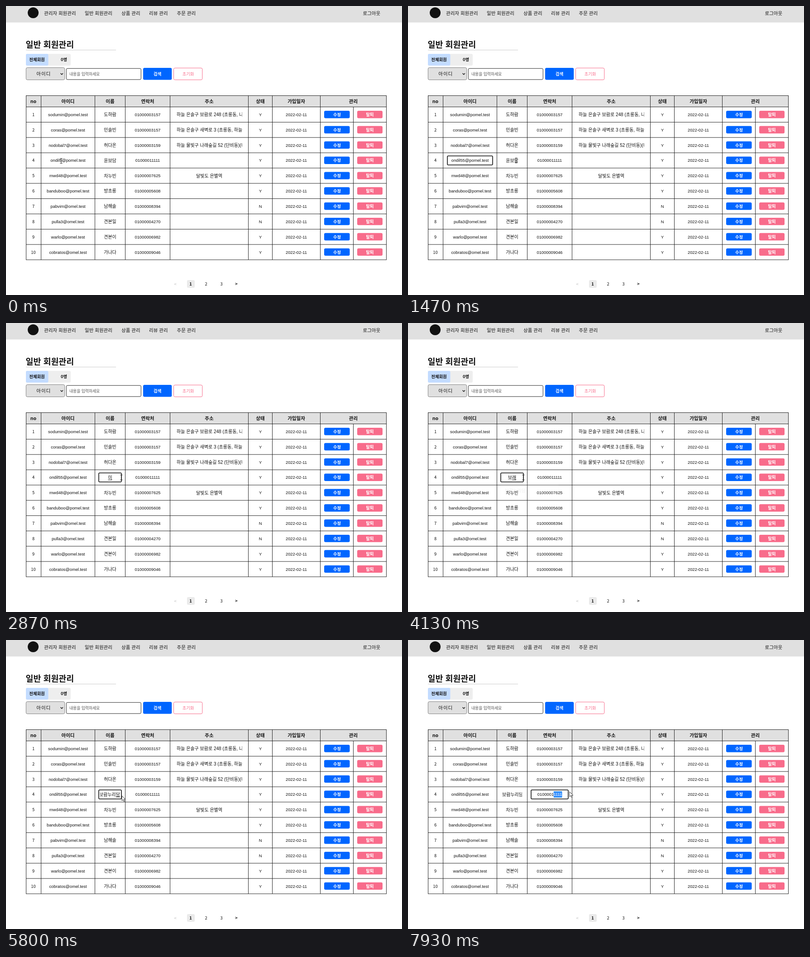
These frames come from a looping animation (875 by 640 pixels, 8 s). An HTML page:

```html
<!DOCTYPE html>
<html lang="ko">
<head>
<meta charset="utf-8">
<style>
  html, body { margin: 0; width: 100%; height: 100%; overflow: hidden; background: #fff; }
  svg { display: block; }
  text { font-family: "Noto Sans CJK KR", "Noto Sans CJK", sans-serif; white-space: pre; }
  .data { font-family: "Liberation Sans", "Noto Sans CJK KR", "Noto Sans CJK", sans-serif; }
</style>
</head>
<body>
<svg width="875" height="640" viewBox="0 0 875 640">
  <defs>
    <clipPath id="address"><rect x="377" y="225" width="145" height="330"/></clipPath>
    <clipPath id="name"><rect x="208" y="333" width="44" height="18"/></clipPath>
    <clipPath id="selection"><rect id="selectionBox" y="335" height="14"/></clipPath>
  </defs>
  <g id="page"></g>
  <g id="live"></g>
</svg>
<script>
const LOOP = 8000, ROW = 33.85, BLUE = '#0066ff', PINK = '#f86c8b', GREY = '#e0e0e0';
const $ = id => document.getElementById(id);

const rect = (x, y, w, h, fill, extra = '') =>
  `<rect x="${x}" y="${y}" width="${w}" height="${h}" fill="${fill}" ${extra}/>`;

// Text is placed by its visual middle line.
function label(str, x, y, { size = 9.33, weight = 400, fill = '#111', anchor = 'middle', extra = '' } = {}) {
  return `<text x="${x}" y="${y + size * 0.36}" font-size="${size}" font-weight="${weight}" ` +
    `fill="${fill}" text-anchor="${anchor}" ${extra}>${str}</text>`;
}
const latin = (str, x, y, opt = {}) => label(str, x, y, { ...opt, extra: 'class="data"' });
const hangul = (str, x, y, opt = {}) => latin(str, x, y, { size: 10, ...opt });

const members = [
  ['sodumin@pomel.test', '도하람', '01000003157', '하늘 은솔구 보람로 248 (초롱동, 나'],
  ['coras@pomel.test', '민솔빈', '01000003157', '하늘 은솔구 새벽로 3 (초롱동, 하늘'],
  ['nodobal7@omel.test', '허다온', '01000003159', '하늘 물빛구 나래숲길 52 (단비동)(나'],
  [],
  ['mwd48@pomel.test', '차누빈', '01000007625', '달빛도 은별역'],
  ['banduboo@pomel.test', '방초롱', '01000005608', ''],
  ['pabvim@omel.test', '남해솔', '01000008394', '', 'N'],
  ['pulla3@omel.test', '견본일', '01000004270', '', 'N'],
  ['warlo@pomel.test', '견본이', '01000006982', ''],
  ['cobratos@omel.test', '가나다', '01000009046', '']
];

function drawTable() {
  let s = rect(44, 198, 796.5, 25.5, GREY);
  const heads = { no: 60.5, '아이디': 137, '이름': 230, '연락처': 313, '주소': 449, '상태': 562, '가입일자': 641.5, '관리': 767.5 };
  for (const [str, x] of Object.entries(heads)) s += label(str, x, 211, { size: 10.5, weight: 700 });

  let lines = 'M44 198.5H841M767.5 223.5V562';
  for (const x of [44, 77, 196, 263, 362, 535, 588, 694, 840]) lines += `M${x + 0.5} 198.5V562`;
  for (let i = 0; i <= 10; i++) lines += `M44 ${223.5 + ROW * i}H841`;
  s += `<path d="${lines}" stroke="#111" stroke-width=".9"/>`;

  members.forEach(([email, name, phone, address, state = 'Y'], i) => {
    const y = 240.5 + ROW * i, top = y - 8.5;
    s += label(i + 1, 60.5, y);
    if (email) {
      s += latin(email, 137, y) + hangul(name, 230, y) + latin(phone, 313, y);
      const long = address.length > 10;
      s += `<g clip-path="url(#address)">${hangul(address, long ? 377 : 449, y, { anchor: long ? 'start' : 'middle' })}</g>`;
    }
    s += latin(state, 562, y) + latin('2022-02-11', 641.5, y);
    s += rect(703, top, 56.5, 16.4, BLUE, 'rx="3"') + label('수정', 731.5, y, { weight: 700, fill: '#fff' });
    s += rect(776, top, 56, 16.4, PINK, 'rx="3"') + label('탈퇴', 804, y, { weight: 700, fill: '#fff' });
  });
  return s;
}

function drawPage() {
  let s = rect(0, 0, 875, 36.5, GREY) + '<circle cx="60" cy="15" r="12" fill="#111"/>';
  const menu = { '관리자 회원관리': 84, '일반 회원관리': 174, '상품 관리': 255, '리뷰 관리': 316, '주문 관리': 377.5, '로그아웃': 788.5 };
  for (const [str, x] of Object.entries(menu)) s += label(str, x, 16.5, { size: 10.5, weight: 500, anchor: 'start' });

  s += label('일반 회원관리', 43.5, 85, { size: 18.4, weight: 700, anchor: 'start' });
  s += rect(44, 97, 199, 1, '#ccc');
  s += rect(44, 106, 99, 26, '#eee', 'rx="3"') + rect(44, 106, 49.5, 26, '#c3dcff', 'rx="3"');
  s += label('전체회원', 68.5, 119, { weight: 700 }) + label('0명', 128, 119, { weight: 700 });

  s += rect(44.3, 136.5, 85.4, 27, GREY, 'rx="3" stroke="#777" stroke-width=".9"');
  s += label('아이디', 83.3, 150, { size: 10.5, weight: 500, extra: 'letter-spacing="1"' });
  s += '<path d="M120.5 149l2.7 2.7 2.7-2.7" fill="none" stroke="#111" stroke-width="1.4"/>';
  s += rect(133.3, 138.3, 165, 24.6, '#fff', 'rx="2.5" stroke="#111" stroke-width=".9"');
  s += label('내용을 입력하세요', 140, 150.5, { size: 8.8, fill: '#555', anchor: 'start' });
  s += rect(303, 137, 63.3, 26.6, BLUE, 'rx="3"') + label('검색', 334.7, 150.5, { weight: 700, fill: '#fff' });
  s += rect(370.5, 137.3, 63.3, 26.2, '#fff', `rx="3" stroke="${PINK}"`);
  s += label('초기화', 402.5, 150.5, { weight: 500, fill: PINK });

  s += drawTable();

  s += rect(400, 607, 17, 17, '#eaeaea', 'rx="3"');
  s += label('&lt;', 374, 615.5, { fill: '#bbb' }) + label('1', 408, 615.5, { weight: 700 });
  s += label('2', 442, 615.5) + label('3', 476, 615.5) + label('&gt;', 509, 615.5, { weight: 700 });
  $('page').innerHTML = s;
}

// Pointer path: time, x, y
const path = [
  [0, 122, 343], [600, 122, 343], [870, 146, 344], [1130, 146, 344], [1400, 239, 342],
  [1800, 239, 342], [2070, 215, 342], [2200, 221, 342], [2400, 255, 342], [5780, 255, 342],
  [5800, 256, 345], [6000, 266, 351], [6400, 322, 342], [6670, 322, 342], [6930, 348, 342],
  [7870, 348, 342], [7930, 357, 336], [LOOP, 357, 336]
];
// Typed states of the name field
const typing = [
  [0, '윤보담'], [2860, '미'], [3400, ''], [3670, 'ㅂ'], [3800, '보'], [3930, '볼'], [4000, '보라'],
  [4070, '보래'], [4330, '보라'], [4470, '보람'], [4600, '보람ㄴ'], [4670, '보람누'], [4800, '보람눌'],
  [5070, '보람누리'], [5200, '보람누리ㄷ'], [5270, '보람누리다'], [5330, '보람누리담']
];
const lastBefore = (list, t) => list.filter(k => k[0] <= t).pop();

function pointerAt(t) {
  const i = Math.max(1, path.findIndex(k => k[0] > t));
  const [t0, x0, y0] = path[i - 1], [t1, x1, y1] = path[i];
  const p = (t - t0) / (t1 - t0);
  return [x0 + (x1 - x0) * p, y0 + (y1 - y0) * p];
}

function drawPointer(x, y) {
  const overInput = x < 256 || (x >= 271 && x < 355);
  return `<g transform="translate(${x} ${y})">` + (overInput
    ? '<path d="M-2.5-5.5h2l.5.5.5-.5h2M0-5V5M-2.5 5.5h2l.5-.5.5.5h2" fill="none" stroke="#222"/>'
    : '<path d="M0 0v11l2.6-2.4 1.8 4 1.8-.8-1.8-3.9h3.5z" fill="#fff" stroke="#222" stroke-width=".9"/>') + '</g>';
}

const focusBox = (x, w) => rect(x + 1, 332, w - 2, 20, '#fff', 'rx="2" stroke="#111" stroke-width="1.6"');

function selected(text, left, right) {
  $('selectionBox').setAttribute('x', left);
  $('selectionBox').setAttribute('width', Math.max(0, right - left));
  return `<g clip-path="url(#selection)">${rect(left, 335, 60, 14, '#338fff')}${text('#fff')}</g>`;
}

// Suggestion list under the name field: shown, then faded out
function suggestion(t) {
  const shows = [[3800, 4000], [4400, 4600], [5070, 5200]];
  const show = lastBefore(shows, t);
  const alpha = show ? Math.min(1, 1 - (t - show[1]) / 140) : 0;
  if (alpha <= 0) return '';
  return `<g opacity="${alpha}">${rect(204.5, 354.5, 128, 34, '#fff', 'rx="2" stroke="#ddd"')}` +
    hangul('보람누리담', 214, 371, { anchor: 'start' }) + '</g>';
}

function draw(t) {
  const y = 342, [px, py] = pointerAt(t);
  const onEmail = t >= 330 && t < 1530, onName = t >= 1530 && t < 6670, onPhone = t >= 6670;
  let s = '';
  if (onEmail) s += focusBox(86, 102);
  if (onName) s += focusBox(204, 52);
  if (onPhone) s += focusBox(271, 84);

  s += latin(t < 1070 ? 'ondil5@pomel.test' : 'ondil55@pomel.test', 137, y);

  const name = lastBefore(typing, t)[1], overflow = name.length > 4;
  const [x, anchor] = !overflow ? [230, 'middle'] : onName ? [252, 'end'] : [208, 'start'];
  const nameText = fill => hangul(name, x, y, { anchor, fill });
  s += `<g clip-path="url(#name)">${nameText('#111')}</g>`;
  if (t >= 1600 && t < 2860)
    s += '<path d="M216 347.5h28" stroke="#e33" stroke-dasharray="1.5 1"/>';
  if (t >= 2200 && t < 2860) s += selected(nameText, 216, Math.min(244, px));
  if (t >= 2860 && t < 6000 && name) {
    const end = overflow ? 252 : 230 + 4.6 * name.length;
    s += rect(end - 9.2, 347, 9.2, 1, '#222');
  }

  const phoneText = fill => latin('01000011111', 313, y, { fill });
  s += phoneText('#111');
  if (onPhone) s += selected(phoneText, 321.5, Math.min(340.5, px));

  $('live').innerHTML = s + suggestion(t) + drawPointer(px, py);
}

drawPage();
const start = performance.now();
(function tick() {
  draw((performance.now() - start) % LOOP);
  requestAnimationFrame(tick);
})();
</script>
</body>
</html>
```
